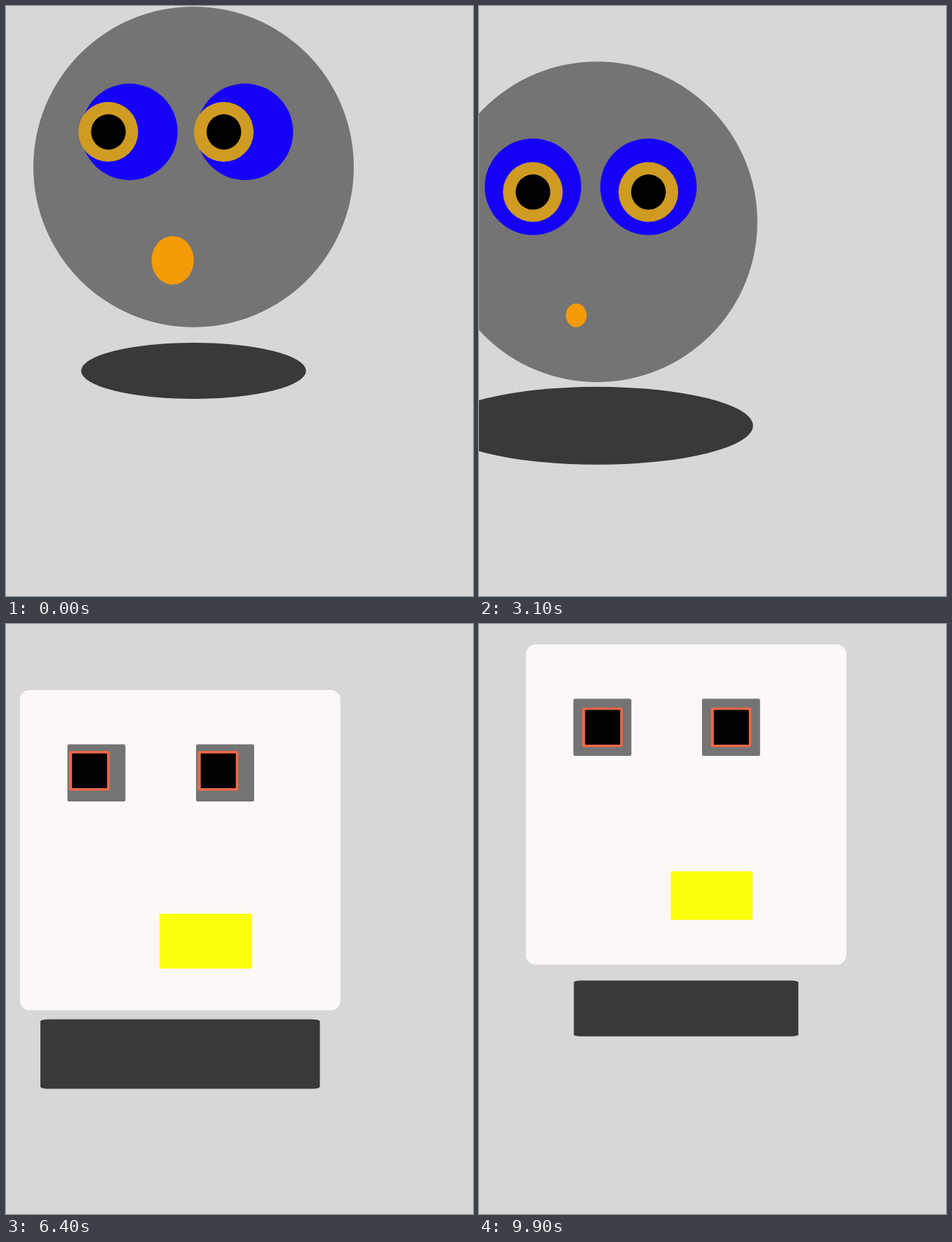
An HTML page with a canvas for the animation above (10000 ms loop, 666 by 841 pixels).

```html
<!DOCTYPE html>
<html lang="en">
<head>
<meta charset="utf-8">
<title>Two faces</title>
<style>
html, body { margin: 0; width: 100%; height: 100%; overflow: hidden; background: #d7d7d7; }
canvas { display: block; }
</style>
</head>
<body>
<canvas id="stage" width="666" height="841"></canvas>
<script>
const ctx = document.getElementById('stage').getContext('2d');
const LOOP = 10000, MOVE = 5000, STEP = 100;

function bezier(x1, y1, x2, y2) {
  const at = (a, b, s) => 3 * a * s * (1 - s) ** 2 + 3 * b * s * s * (1 - s) + s ** 3;
  return x => {
    if (x <= 0) return 0;
    if (x >= 1) return 1;
    let lo = 0, hi = 1;
    for (let i = 0; i < 30; i++) {
      const mid = (lo + hi) / 2;
      if (at(x1, x2, mid) < x) lo = mid; else hi = mid;
    }
    return at(y1, y2, lo);
  };
}
const ease = bezier(0.25, 0.1, 0.25, 1);
const easeInOut = bezier(0.42, 0, 0.58, 1);
const clamp = v => Math.min(1, Math.max(0, v));
const mix = (a, b, k) => a + (b - a) * k;

// keys: [position, value, value...]
function track(keys, u) {
  const i = keys.findIndex(k => k[0] > u);
  if (i < 0) return keys[keys.length - 1].slice(1);
  if (i === 0) return keys[0].slice(1);
  const a = keys[i - 1], b = keys[i];
  const k = easeInOut((u - a[0]) / (b[0] - a[0]));
  return a.slice(1).map((v, j) => mix(v, b[j + 1], k));
}

function oval(color, x, y, rx, ry = rx) {
  ctx.fillStyle = color;
  ctx.beginPath();
  ctx.ellipse(x, y, rx, ry, 0, 0, Math.PI * 2);
  ctx.fill();
}

function box(color, x, y, w, h, rx = 0, ry = rx) {
  ctx.fillStyle = color;
  ctx.beginPath();
  ctx.roundRect(x - w / 2, y - h / 2, w, h, [{ x: rx, y: ry }]);
  ctx.fill();
}

const round = {
  look: [[0, -30, 0], [0.4, 0, 31], [0.5, 0, 31], [0.7, 0, 0]],
  lid: [[0.28, 0], [0.4, 1], [0.5, 1], [0.62, 0]],
  mouth: [[0, 1], [0.47, 1.335], [0.75, 0]]
};

function drawRound(u) {
  const e = ease(u), s = 1 + 0.43 * e;
  const x = 268.1 - 110 * e, y = 228.9 + 87 * e;
  const [lx, ly] = track(round.look, u);
  const [lid] = track(round.lid, u);
  const [m] = track(round.mouth, u);

  oval('#393939', x, y + 290.6, 160 * s, 39.9 * s);
  oval('#747474', x, y, 228.5);
  for (const dx of [-91.5, 73.2]) {
    const ex = x + dx, ey = y - 50;
    oval('#1500f8', ex, ey, 68.8);
    oval('#cf9b22', ex + lx - 0.2, ey + ly, 42.6);
    oval('#000', ex + lx, ey + ly, 24.7, 25.2);
    if (lid > 0) {
      const h = 139.5 * lid;
      box('#747474', ex, ey - 69 + h / 2, 136.6, h);
    }
  }
  if (m > 0) oval('#f59b08', x - 29.8, y + 133.2, 30.2 * m, 34.6 * m);
}

const square = {
  look: [[0, 0, 0], [0.2, -12.5, 0], [0.4, 0, -16], [0.6, 14, 0], [0.8, 0, -144], [0.95, 0, 0]],
  mouth: [[0, 1], [0.2, 1.19], [0.4, 0.872], [0.6, 1.2], [0.8, 1.25], [0.96, 1]]
};

function drawSquare(u) {
  const e = ease(u), s = 1.431 - 0.431 * e;
  const x = 212.8 + 82.6 * e, y = 371.4 - 114.3 * e;
  const [lx, ly] = track(square.look, u);
  const [m] = track(square.mouth, u);

  box('#393939', x, y + 290.8, 320 * s, 79.6 * s, 10 * s, 2.5 * s);
  box('#fcf8f8', x, y, 457, 456.6, 14);
  for (const dx of [-119.4, 64.1]) {
    const ex = x + dx, ey = y - 109.9;
    box('#747474', ex, ey, 82.8, 81.6, 2.5);
    box('#ef6848', ex + lx, ey + ly, 57.8, 56.6, 2.5);
    box('#000', ex + lx + 0.4, ey + ly, 50, 49.6, 1);
  }
  box('#fcff0b', x + 36.5, y + 130, 116.6 * m, 69.2 * m, 2);
}

function draw(t) {
  ctx.fillStyle = '#d7d7d7';
  ctx.fillRect(0, 0, 666, 841);
  if (t < 5050) drawRound(clamp((t + 60) / MOVE));
  else drawSquare(clamp((t - 5100) / MOVE));
}

const start = performance.now();
function tick() {
  const t = (performance.now() - start) % LOOP;
  draw(Math.floor(t / STEP) * STEP);
  requestAnimationFrame(tick);
}
tick();
</script>
</body>
</html>
```
